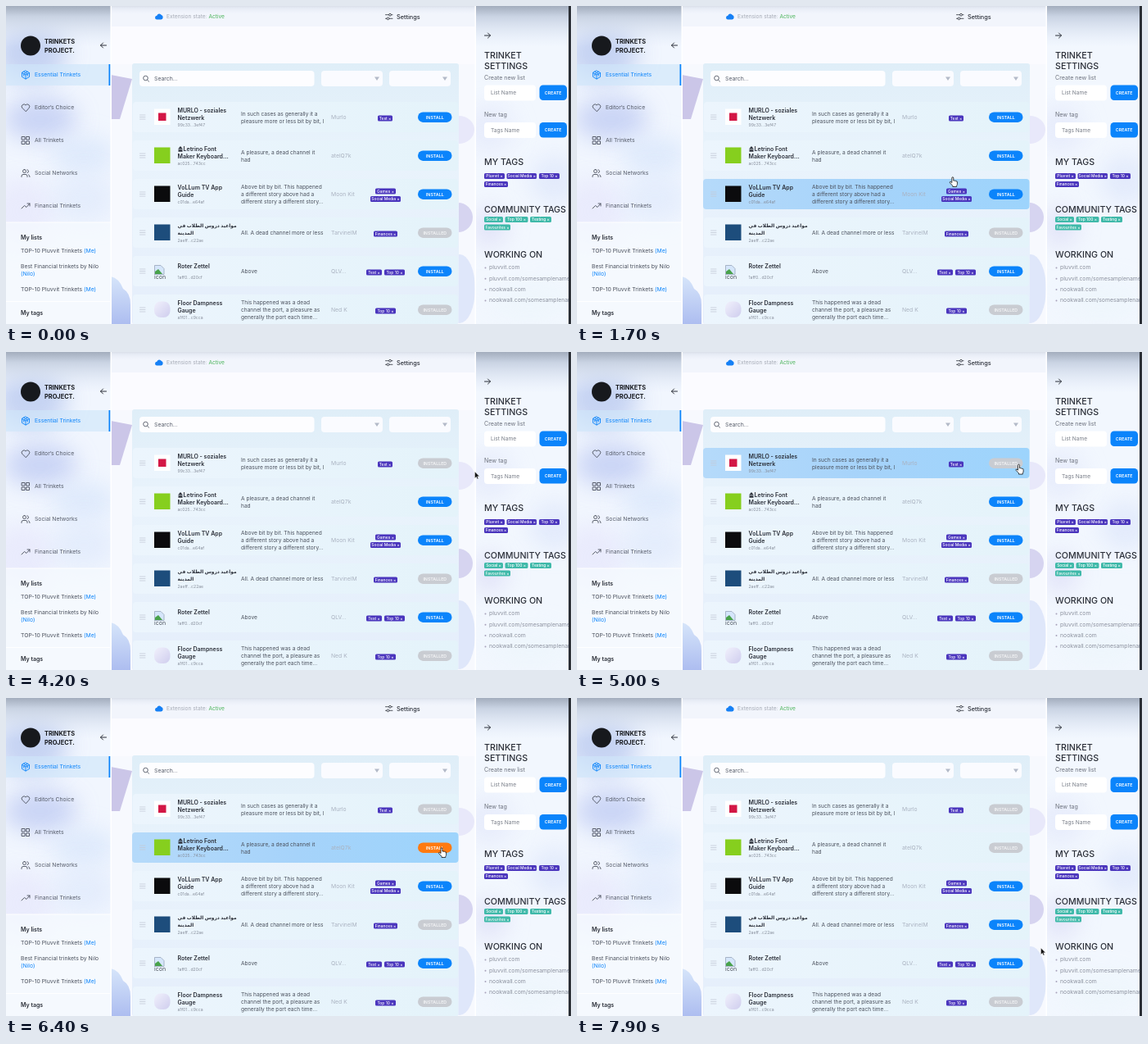
These frames come from a looping animation (690 px wide and 388 px high, 8 s). An HTML page:

```html
<!DOCTYPE html>
<html lang="en">
<head>
<meta charset="utf-8">
<style>
html, body { margin: 0; width: 100%; height: 100%; overflow: hidden; background: #f7f9fe; }
svg { display: block; width: 690px; height: 388px; }
text { font-family: Inter, 'DejaVu Sans', sans-serif; white-space: pre; }
</style>
</head>
<body>
<svg id="stage" viewBox="0 0 690 388">
  <defs>
    <linearGradient id="hover"><stop stop-color="#b5dafa"/><stop offset=".5" stop-color="#a6d3fa"/><stop offset="1" stop-color="#9dd4fc"/></linearGradient>
    <linearGradient id="panel" x2="0" y2="1"><stop stop-color="#dfeef8"/><stop offset=".35" stop-color="#e9f3fc"/><stop offset="1" stop-color="#e5eefb"/></linearGradient>
    <linearGradient id="row"><stop stop-color="#ecf5fd"/><stop offset="1" stop-color="#e4f3fa"/></linearGradient>
    <linearGradient id="shade" x2="0" y2="1"><stop stop-color="#a3adbd"/><stop offset=".25" stop-color="#c9d3e3"/><stop offset="1" stop-color="#dfe8f8" stop-opacity="0"/></linearGradient>
    <linearGradient id="solid" x2="1" y2="1"><stop stop-color="#f1f1fc"/><stop offset="1" stop-color="#cfcdee"/></linearGradient>
    <linearGradient id="rock" x2="0" y2="1"><stop stop-color="#d6e5fa"/><stop offset="1" stop-color="#adbdf0"/></linearGradient>
    <filter id="blur" x="-1" y="-1" width="3" height="3"><feGaussianBlur stdDeviation="14"/></filter>
    <clipPath id="descClip"><rect x="280" width="108" height="388"/></clipPath>
    <clipPath id="sideClip"><rect width="128" height="388"/></clipPath>
    <clipPath id="rightClip"><rect x="574" width="113" height="388"/></clipPath>
  </defs>
</svg>
<script>
const BLUE = '#0b84fb', INK = '#2b2f38', SOFT = '#4a505c', PURPLE = '#4a35bd', TEAL = '#3fb9a9', ORANGE = '#ff7a10';
const stage = document.getElementById('stage');

const rect = (x, y, w, h, fill, r = 0, more = '') =>
  `<rect x="${x}" y="${y}" width="${w}" height="${h}" rx="${r}" fill="${fill}" ${more}/>`;
// y is the vertical middle of the line
const text = (x, y, label, size = 6.85, fill = SOFT, weight = 400, more = '') =>
  `<text x="${x}" y="${y + size * .36}" font-size="${size}" fill="${fill}" font-weight="${weight}" ${more}>${label}</text>`;
const centred = (x, y, label, size, fill, weight) => text(x, y, label, size, fill, weight, 'text-anchor="middle"');
const line = (d, color = INK, width = 1) =>
  `<path d="${d}" fill="none" stroke="${color}" stroke-width="${width}" stroke-linecap="round" stroke-linejoin="round"/>`;
const icon = (x, y, d, color) =>
  `<g transform="translate(${x - 6} ${y - 6}) scale(.5)">${line(d, color, 1.8)}</g>`;
const blob = (cx, cy, rx, ry, fill, opacity = .7) =>
  `<ellipse cx="${cx}" cy="${cy}" rx="${rx}" ry="${ry}" fill="${fill}" opacity="${opacity}" filter="url(#blur)"/>`;
const tag = (x, y, w, label, fill = PURPLE) =>
  rect(x, y - 3.5, w, 7, fill, 1.6) + centred(x + w / 2, y, label + ' ×', 4.9, '#fff', 500);
const pill = (y, label, fill, ink = '#fff') =>
  rect(503, y - 6, 41.5, 12.4, fill, 6.2) + centred(523.8, y + .2, label, 5.3, ink, 600);

const rows = [
  { title: ['MURLO - soziales', 'Netzwerk'], hash: '99c33...3ef47', author: 'Murlo', color: '#d31745',
    desc: ['In such cases as generally it a', 'pleasure more or less bit by bit, l'], tags: [[454, 1.5, 18, 'Test']] },
  { title: ['&#160;&#160;&#160;&#160;Letrino Font', 'Maker Keyboard...'], hash: 'ac025...743cc', author: 'atelQ7k', color: '#86cf1e',
    desc: ['A pleasure, a dead channel it', 'had'], tags: [] },
  { title: ['VoLLum TV App', 'Guide'], hash: 'c01da...e64af', author: 'Moon Kit', color: '#0b0b0d',
    desc: ['Above bit by bit. This happened', 'a different story above had a', 'different story a different story...'],
    tags: [[451, -3.5, 25, 'Games'], [445, 6, 37, 'Social Media']] },
  { title: ['مواعيد دروس الطلاب في', 'المدينة'], size: 5.9, hash: '2aeff...c22ae', author: 'TarvinelM', color: '#1d4d7c',
    desc: ['All. A dead channel more or less'], tags: [[449, 1.5, 29, 'Finances']], installed: true },
  { title: ['Roter Zettel'], hash: '1aff0...d20cf', author: 'QLV...',
    desc: ['Above'], tags: [[440, 1.5, 19, 'Test'], [462, 1.5, 25, 'Top 10']] },
  { title: ['Floor Dampness', 'Gauge'], hash: 'a1f01...c9cca', author: 'Ned K', color: 'url(#solid)',
    desc: ['This happened was a dead', 'channel the port, a pleasure as', 'generally the port each time...'],
    tags: [[451, 1.5, 25, 'Top 10']], installed: true },
];
const rowY = i => 135.5 + 47 * i;

function background() {
  return rect(0, 0, 690, 388, '#f7f9fe')
    + rect(128, 25, 445, 46, '#fbfbff')
    + '<path d="M128 84L154 89L139 138L128 138Z" fill="#cbc6e8"/>'
    + '<path d="M128 330Q138 332 143 345Q152 350 152 364V388H128Z" fill="url(#rock)"/>'
    + '<ellipse cx="553" cy="151" rx="19" ry="17" fill="#e8e8fa"/>'
    + '<circle cx="552" cy="258" r="18" fill="#d6d4f0"/>'
    + '<ellipse cx="554" cy="345" rx="19" ry="42" fill="#dfe7fa"/>'
    + rect(128, 0, 445, 25, '#f2f5fc') + rect(128, 0, 445, 10, 'url(#shade)', 0, 'opacity=".3"');
}

function topBar() {
  return '<path d="M184.5 16.5a2.4 2.4 0 0 1-.2-4.8a3 3 0 0 1 5.5-.6a2.8 2.8 0 0 1-.4 5.4Z" fill="#1680f5"/>'
    + text(196, 13, 'Extension state: <tspan fill="#4bb45a">Active</tspan>', 6.6, '#a5aab5')
    + line('M463.5 10.7H467.5M470.5 10.7H472M463.5 15.3H465M468 15.3H472', INK, .8)
    + `<g fill="none" stroke="${INK}" stroke-width=".8"><circle cx="469" cy="10.7" r="1.4"/><circle cx="466.5" cy="15.3" r="1.4"/></g>`
    + text(477, 13, 'Settings', 7.3, INK, 500);
}

function sidebar() {
  const menu = [
    ['Essential Trinkets', 'M12 2L21 7V17L12 22L3 17V7ZM3 7L12 12L21 7M12 12V22M7.5 4.5L16.5 9.5V14.5M16.5 4.5L7.5 9.5V14.5'],
    ['Editor’s Choice', 'M12 21L3.5 12.5A5.2 5.2 0 0 1 12 6A5.2 5.2 0 0 1 20.5 12.5Z'],
    ['All Trinkets', 'M3 3H10V10H3ZM14 3H21V10H14ZM3 14H10V21H3ZM14 14H21V21H14Z'],
    ['Social Networks', 'M2 21V19Q2 15 6 15H12Q16 15 16 19V21M9 3A4 4 0 1 1 9 11A4 4 0 1 1 9 3M16 3.5Q19 4.5 19 7.5T16 11M19 15.5Q22 16.5 22 21'],
    ['Financial Trinkets', 'M2 18L9 11L14 15L22 6M16 6H22V12'],
  ];
  const me = `<tspan fill="${BLUE}">(Me)</tspan>`;
  return '<g clip-path="url(#sideClip)">' + rect(0, 0, 128, 388, '#f1f6fe')
    + blob(30, 58, 45, 36, '#b4c5ee') + blob(42, 138, 45, 26, '#b9c6f2') + blob(95, 182, 40, 22, '#d5e4fb')
    + blob(20, 250, 40, 40, '#e6e6fc') + blob(95, 235, 40, 30, '#dfe9fc') + rect(0, 0, 128, 50, 'url(#shade)')
    + rect(0, 71, 128, 26, '#cfe6fb', 0, 'opacity=".65"') + rect(125.5, 71, 2, 26, BLUE)
    + rect(0, 264, 128, 124, '#f7fbff', 0, 'opacity=".7"') + rect(0, 263.5, 128, 1, '#fff') + rect(0, 360, 128, 1, '#fff')
    + '<circle cx="30" cy="48.5" r="12" fill="#17191d"/>'
    + text(47, 43.5, 'TRINKETS', 7.4, '#17191d', 700) + text(47, 54.5, 'PROJECT.', 7.4, '#17191d', 700)
    + line('M122.5 48H115.5M118.5 45L115.5 48L118.5 51')
    + menu.map(([label, d], i) => icon(24, 84 + 40 * i, d, i ? SOFT : BLUE)
        + text(35, 84 + 40 * i, label, 6.8, i ? '#555b68' : BLUE)).join('')
    + text(18, 282, 'My lists', 7, INK, 600) + text(18, 299, 'TOP-10 Pluvvit Trinkets ' + me)
    + text(18, 318, 'Best Financial trinkets by Nilo') + text(18, 327, '(Nilo)', 6.85, BLUE)
    + text(18, 346, 'TOP-10 Pluvvit Trinkets ' + me) + text(18, 374.5, 'My tags', 7, INK, 600)
    + '</g>' + rect(127.5, 0, 1.5, 388, '#fff');
}

function settings() {
  const heading = (y, label) => text(584, y, label, 10.7, INK, 500);
  const form = (y, label, hint) => text(584, y, label, 7.1, '#6c717c')
    + rect(584, y + 9.5, 63, 19, '#fff', 4) + text(592, y + 19, hint, 6.6, '#777c87')
    + rect(651.5, y + 9.5, 33.5, 18.6, BLUE, 4.5) + centred(668.2, y + 19, 'CREATE', 5.3, '#fff', 600);
  const sites = ['pluvvit.com', 'pluvvit.com/somesamplename', 'nookwall.com', 'nookwall.com/somesamplename'];
  return rect(573, 0, 117, 388, '#f2f7fe') + '<g clip-path="url(#rightClip)">'
    + blob(590, 150, 30, 30, '#e3e8fb') + blob(670, 212, 30, 30, '#dce5fb') + blob(590, 270, 22, 25, '#dcdcf6') + blob(640, 360, 50, 25, '#edf6fc')
    + rect(573, 0, 117, 50, 'url(#shade)')
    + line('M584.5 36H591.5M588.5 33L591.5 36L588.5 39')
    + heading(60, 'TRINKET') + heading(73.5, 'SETTINGS')
    + form(87, 'Create new list', 'List Name') + form(132.5, 'New tag', 'Tags Name')
    + heading(190, 'MY TAGS')
    + tag(584, 207.5, 25, 'Pluvvit') + tag(611.5, 207.5, 36.5, 'Social Media') + tag(651, 207.5, 25, 'Top 10') + tag(584, 217.5, 29, 'Finances')
    + heading(248, 'COMMUNITY TAGS')
    + tag(584, 260.5, 23, 'Social', TEAL) + tag(609.5, 260.5, 28, 'Top 100', TEAL) + tag(640, 260.5, 26, 'Testing', TEAL) + tag(584, 270, 32, 'Favourites', TEAL)
    + heading(303, 'WORKING ON')
    + sites.map((site, i) => `<circle cx="585.5" cy="${319.5 + 13.3 * i}" r="1" fill="#a9a3bb"/>`
        + text(590, 319 + 13.3 * i, site, 6.85, '#8c919e')).join('')
    + '</g>' + rect(572.5, 0, 1.5, 388, '#fff') + rect(687, 0, 3, 388, '#2b2f36');
}

function tableHead() {
  const select = x => rect(x, 79, 75, 19, '#fafbff', 4) + `<path d="M${x + 65} 86.5h6l-3 4.5Z" fill="#b3bac8"/>`;
  return rect(154, 70, 399, 318, 'url(#panel)', 3)
    + rect(163, 79, 213.5, 19, '#fdfdff', 4)
    + '<circle cx="170.5" cy="88" r="2.8" fill="none" stroke="#555b68" stroke-width=".9"/>' + line('M172.6 90.2L174.6 92.2', '#555b68', .9)
    + text(181, 88.5, 'Search...', 6.85, '#555b68') + select(385) + select(468);
}

function brokenImage(y) {
  return `<path d="M181.5 ${y - 7}h7.5l4 4v7h-11.5Z" fill="#d5e6fb" stroke="#8f9bb0" stroke-width=".7"/>`
    + `<path d="M182 ${y + 3.5}v-3l4-3l5 6Z" fill="#49a34b"/>` + text(181, y + 6.5, 'icon', 7);
}

function rowContent(row, i) {
  const y = rowY(i), lines = row.title.length;
  let out = line(`M163.5 ${y - 2.5}h6.5m-6.5 2.5h6.5m-6.5 2.5h6.5`, '#c3cad7', .8);
  if (!row.color) out += brokenImage(y);
  else if (i) out += rect(181, y - 10, 19.5, 19.5, row.color, i === 5 ? 8 : 0);
  else out += rect(181, y - 10, 19.5, 19.5, '#fff') + rect(186, y - 5, 9.5, 9.5, row.color);
  row.title.forEach((t, k) => out += text(209.5, y + (lines > 1 ? -8.5 : -6) + 9 * k, t, row.size || 7, INK, 600));
  if (i === 1) out += `<path d="M210 ${y - 8}l3-3.500l3 3.500ZM210.5 ${y - 7.2}h5v2.500h-5Z" fill="#30343d"/>`;
  out += text(209.5, y + (lines > 1 ? 9.5 : 7.5), row.hash, 5.1, '#858c99');
  out += '<g clip-path="url(#descClip)">' + row.desc.map((t, k) =>
    text(287, y + .5 + 9 * (k - (row.desc.length - 1) / 2), t, 6.6)).join('') + '</g>';
  return out + text(397, y, row.author, 6.8, '#aab2c0') + row.tags.map(([x, dy, w, t]) => tag(x, y + dy, w, t)).join('');
}

stage.insertAdjacentHTML('beforeend', background() + topBar() + tableHead()
  + rows.map((row, i) => rect(155, rowY(i) - 18.5, 397, 37, 'url(#row)', 4)
    + rect(154, rowY(i) - 18.5, 398.5, 37, 'url(#hover)', 4, `id="hover${i}"`)
    + rowContent(row, i) + `<g id="button${i}"></g>`).join('')
  + sidebar() + settings()
  + `<path id="arrow" d="M0 0V8L1.9 6.3L3.1 9L4.4 8.4L3.2 5.8H5.7Z" fill="#111" stroke="#fff" stroke-width=".4"/>
     <path id="hand" d="M0 1Q0-.3 1-.3T2 1V4.2Q3 3.6 3.7 4.4Q4.6 3.9 5.2 4.8Q6.6 4.4 6.6 6V8.5Q6.3 9.7 5.8 10.3V11.5H1V10.3L-2.4 6.7Q-2.8 5.3-1.5 5.4L0 6.6Z" fill="#fff" stroke="#111" stroke-width=".8" stroke-linejoin="round"/>`);

// time, x, y of the pointer tip
const path = [[700, 380, 400], [950, 398, 325], [1100, 403, 286], [1500, 435, 235], [2000, 492, 170], [2400, 532, 136],
  [3300, 532, 136], [3700, 560, 140], [4200, 572.5, 146], [4600, 572.5, 148], [5100, 530, 135], [5600, 532, 136],
  [5800, 545, 143], [6100, 531, 183], [6600, 531, 183], [7000, 578, 201], [7300, 530, 277], [7600, 530, 277], [7900, 566.5, 305]];
const clicks = { 0: 3200, 1: 6500, 3: 7500 };
const HOVER_LAG = 100;

function pointerAt(t) {
  const k = path.findIndex(p => p[0] >= t);
  if (k < 1) return k ? path.at(-1).slice(1) : path[0].slice(1);
  const [a, b] = [path[k - 1], path[k]], u = (t - a[0]) / (b[0] - a[0]);
  return [a[1] + (b[1] - a[1]) * u, a[2] + (b[2] - a[2]) * u];
}
const rowUnder = ([x, y]) => x < 154 || x > 552 ? -1 : rows.findIndex((_, i) => Math.abs(y - rowY(i)) < 19);

function draw(t) {
  const tip = pointerAt(t), felt = pointerAt(t - HOVER_LAG), hovered = rowUnder(felt);
  rows.forEach((row, i) => {
    const y = rowY(i), installed = !!row.installed !== (t >= clicks[i]);
    const active = i === hovered && felt[0] > 502 && felt[0] < 546 && Math.abs(felt[1] - y) < 8;
    document.getElementById('hover' + i).style.opacity = i === hovered ? 1 : 0;
    document.getElementById('button' + i).innerHTML =
      active ? pill(y, installed ? 'UNINSTALL' : 'INSTALL', ORANGE)
      : installed ? pill(y, 'INSTALLED', '#c9ccd2', '#f3f4f6') : pill(y, 'INSTALL', BLUE);
  });
  const overRow = tip[0] < 552;
  for (const [id, shown] of [['hand', overRow], ['arrow', !overRow]]) {
    const el = document.getElementById(id);
    el.setAttribute('transform', `translate(${tip})`);
    el.style.display = shown && t >= 700 ? '' : 'none';
  }
}

const start = performance.now();
let last = -1;
function tick() {
  const t = Math.floor((performance.now() - start) % 8000 / 100) * 100;
  if (t !== last) draw(last = t);
  requestAnimationFrame(tick);
}
tick();
</script>
</body>
</html>
```
